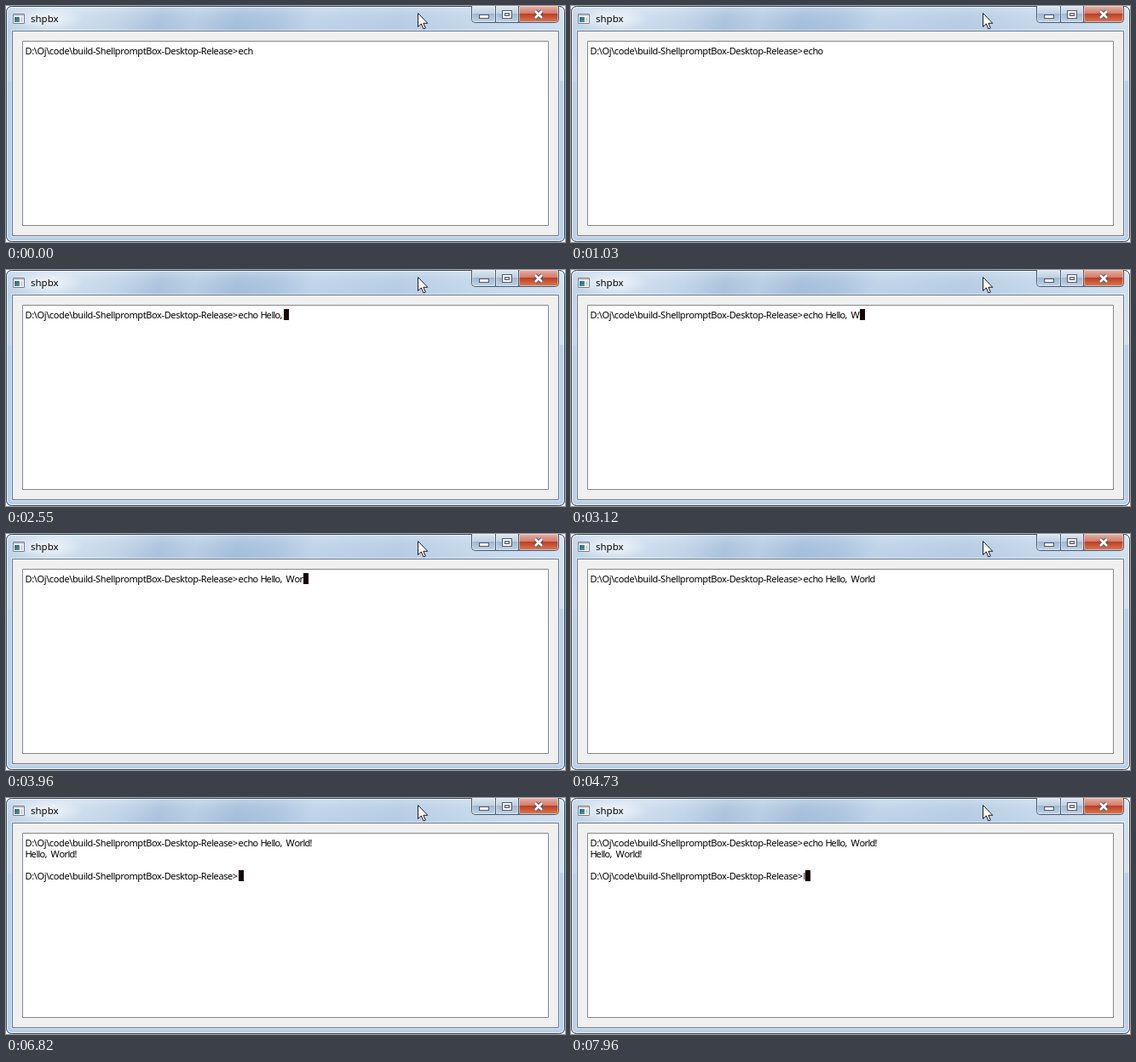
An HTML page with a canvas for the animation above (8 s loop, 656x278 px).

```html
<!DOCTYPE html>
<html lang="en">
<head>
<meta charset="utf-8">
<title>Terminal window</title>
<style>
html, body { margin: 0; width: 100%; height: 100%; overflow: hidden; background: #fff }
canvas { display: block }
</style>
</head>
<body>
<canvas id="stage" width="656" height="278"></canvas>
<script>
const ctx = document.getElementById('stage').getContext('2d');
const LOOP = 8000, LEFT = 23, PROMPT_END = 273, LINE = 13;
const PROMPT = 'D:\\Oj\\code\\build-ShellpromptBox-Desktop-Release>';
const COMMAND = 'echo Hello, World!', REPLY = 'Hello, World!';
const ADVANCE = { e: 6, c: 5, h: 6, o: 6, ' ': 3, H: 7, l: 2, ',': 4, W: 10, r: 4, d: 6, '!': 4 };

// Times of the key presses after "ech"; the last two are Enter and "l".
const KEYS = [250, 910, 1230, 1490, 1820, 2020, 2290, 2550, 2750, 3120, 3490,
  3960, 4420, 4550, 5190, 6180, 7960];
const ENTER = 6180;
const BLINKS = [510, 1030, 1570, 2090, 2640, 3190, 3690, 4220, 4730, 5270, 5780,
  6310, 6820, 7350, 7880];

function rect(x, y, w, h, fill) {
  ctx.fillStyle = fill;
  ctx.fillRect(x, y, w, h);
}

function outline(x, y, w, h, color, radius = 0) {
  ctx.strokeStyle = color;
  ctx.lineWidth = 1;
  ctx.beginPath();
  ctx.roundRect(x + .5, y + .5, w - 1, h - 1, radius);
  ctx.stroke();
}

function gradient(x0, y0, x1, y1, stops) {
  const g = ctx.createLinearGradient(x0, y0, x1, y1);
  stops.forEach(([at, color]) => g.addColorStop(at, color));
  return g;
}

function polygon(points, fill, stroke) {
  ctx.beginPath();
  points.forEach(([x, y]) => ctx.lineTo(x, y));
  ctx.closePath();
  ctx.fillStyle = fill;
  ctx.fill();
  ctx.strokeStyle = stroke;
  ctx.lineWidth = 1;
  ctx.stroke();
}

function drawFrame() {
  rect(0, 0, 656, 278, '#fff');
  ctx.save();
  ctx.beginPath();
  ctx.roundRect(0, 0, 656, 278, 6);
  ctx.clip();
  rect(0, 0, 656, 278, '#b9d1ea');
  rect(0, 0, 656, 88, gradient(0, 0, 630, 190, [
    [0, '#bdd0e5'], [.1, '#d0dfef'], [.2, '#c0d3e8'], [.27, '#a9c1dc'],
    [.33, '#b6cce3'], [.4, '#a3bdd9'], [.47, '#aac3de'], [.53, '#bdd2e8'],
    [.68, '#b4cbe4'], [.8, '#c3d6ea'], [1, '#d3e1f0']]));
  rect(0, 0, 656, 30, gradient(0, 0, 0, 30, [
    [0, 'rgba(255,255,255,.3)'], [.4, 'rgba(255,255,255,.08)'], [1, 'rgba(255,255,255,0)']]));

  // Soft glow behind the caption
  ctx.save();
  ctx.translate(46, 15);
  ctx.scale(1, .3);
  const glow = ctx.createRadialGradient(0, 0, 5, 0, 0, 46);
  glow.addColorStop(0, 'rgba(255,255,255,.65)');
  glow.addColorStop(1, 'rgba(255,255,255,0)');
  rect(-46, -46, 92, 92, glow);
  ctx.restore();
  ctx.restore();

  outline(1, 1, 654, 276, 'rgba(255,255,255,.7)', 5);
  outline(0, 0, 656, 278, '#3c4857', 6);
  outline(6, 28, 644, 244, 'rgba(255,255,255,.45)');
  rect(7, 29, 642, 242, '#f0f0f0');
  outline(7, 29, 642, 242, '#66788c');
  rect(19, 41, 618, 218, '#fff');
  outline(19, 41, 618, 218, '#828790');
}

function drawButton(x, w, colors, radii) {
  ctx.beginPath();
  ctx.roundRect(x + .5, -.5, w - 1, 20, radii);
  ctx.fillStyle = gradient(0, 0, 0, 19, [
    [0, colors[0]], [.47, colors[1]], [.48, colors[2]], [1, colors[3]]]);
  ctx.fill();
  ctx.strokeStyle = '#495a6e';
  ctx.stroke();
  outline(x + 1, 0, w - 2, 19, 'rgba(255,255,255,.45)', 2);
}

function drawControls() {
  const glass = ['#dbe6f2', '#c0d1e3', '#9fb6ce', '#bfd3e8'];
  drawButton(546, 29, glass, [0, 0, 0, 4]);
  drawButton(574, 28, glass, 0);
  drawButton(601, 48, ['#e5b0a3', '#d17a68', '#bc3b24', '#d67c55'], [0, 0, 4, 0]);

  rect(555, 10, 12, 5, '#535666');
  rect(556, 11, 10, 3, '#fff');
  rect(582, 5, 12, 10, '#535666');
  rect(583, 6, 10, 8, '#fff');
  rect(585, 8, 6, 4, '#535666');
  rect(586, 9, 4, 2, '#b9cbdf');

  for (const [width, color] of [[4.6, '#535666'], [2.6, '#fff']]) {
    ctx.strokeStyle = color;
    ctx.lineWidth = width;
    ctx.beginPath();
    ctx.moveTo(621, 6);
    ctx.lineTo(629, 14);
    ctx.moveTo(629, 6);
    ctx.lineTo(621, 14);
    ctx.stroke();
  }
}

function drawCaption() {
  rect(8, 9, 14, 12, '#fff');
  outline(8, 9, 14, 12, '#747d86');
  rect(9, 10, 12, 2, '#c5ccd3');
  rect(10, 13, 6, 6, gradient(10, 13, 16, 19, [[0, '#2c5f91'], [1, '#4a9a95']]));
  rect(17, 13, 3, 6, '#cfd5da');
  ctx.fillStyle = '#000';
  ctx.font = '11.5px "Noto Sans", "Open Sans", sans-serif';
  ctx.letterSpacing = '0px';
  ctx.fillText('shpbx', 29, 19);
}

function drawPointer() {
  polygon([[483.5, 8.5], [483.5, 24.5], [487.3, 21], [490, 27], [492.3, 26],
    [489.8, 20.3], [494.8, 20.3]], '#fff', '#1c1c1c');
}

const baseline = row => 57 + row * LINE;

function drawPrompt(row) {
  ctx.letterSpacing = '-0.39px';
  ctx.fillText(PROMPT, LEFT - .4, baseline(row));
  ctx.letterSpacing = '0px';
}

// Draws on the pixel grid of the terminal and returns the end position.
function drawCells(text, x, row) {
  for (const char of text) {
    ctx.fillText(char, x - .4, baseline(row));
    x += ADVANCE[char];
  }
  return x;
}

function drawTerminal(time) {
  ctx.fillStyle = '#000';
  ctx.font = '11px "Noto Sans", "Open Sans", sans-serif';
  const pressed = KEYS.filter(key => key <= time);
  const entered = time >= ENTER;
  const row = entered ? 3 : 0;

  drawPrompt(0);
  let caret = drawCells(COMMAND.slice(0, 3 + pressed.length), PROMPT_END, 0);
  if (entered) {
    drawCells(REPLY, LEFT, 1);
    drawPrompt(3);
    caret = drawCells(time >= KEYS.at(-1) ? 'l' : '', PROMPT_END, 3);
  }

  // Every key shows the caret, every blink flips it.
  const lastKey = pressed.at(-1);
  const flips = BLINKS.filter(blink => blink > lastKey && blink <= time).length;
  if (pressed.length && flips % 2 === 0) rect(caret, 46 + row * LINE, 6, LINE, '#1a0004');
}

function render() {
  drawFrame();
  drawControls();
  drawCaption();
  drawPointer();
  drawTerminal(performance.now() % LOOP);
  requestAnimationFrame(render);
}
render();
</script>
</body>
</html>
```
